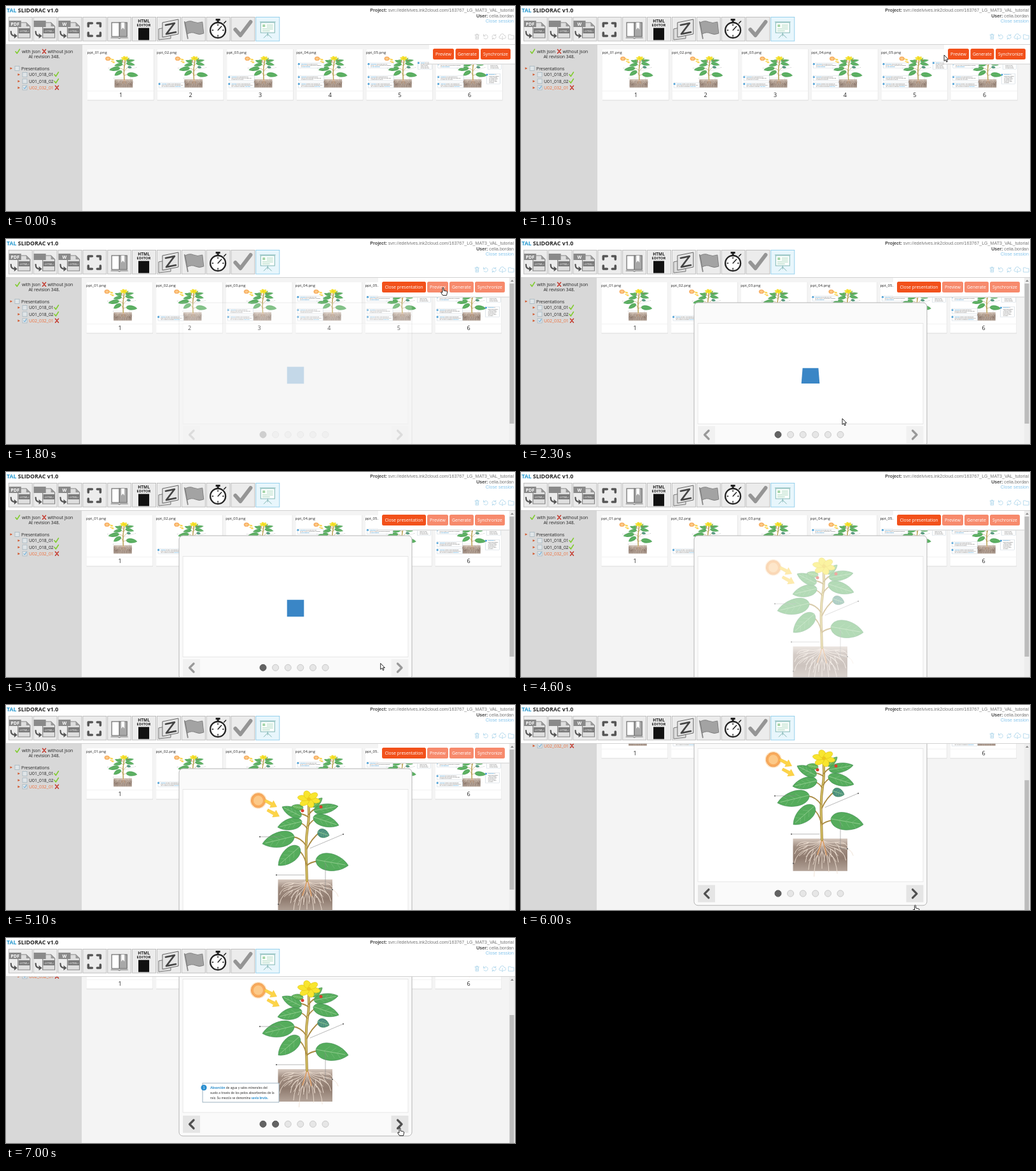
An HTML page for the animation above (7.1 s loop, 800 px wide and 322 px high).

```html
<!DOCTYPE html>
<html lang="en">
<head>
<meta charset="utf-8">
<style>
  html, body { margin: 0; width: 100%; height: 100%; overflow: hidden; background: #fff; }
  svg { display: block; width: 800px; height: 322px; font: 6.9px "Open Sans", sans-serif; fill: #222; }
  .line { fill: none; stroke-linecap: round; stroke-linejoin: round; }
  .arial { font: 7.1px "Liberation Sans", sans-serif; fill: #777; }
  .note { font: 5.2px Lato, sans-serif; fill: #333; }
  .blue { fill: #1d86c8; font-weight: bold; }
  #controls { color: #999; }
  #controls.ready { color: #505050; }
  .nav { fill: #f1f1f1; }
  .ready .nav { fill: #e5e5e5; }
</style>
</head>
<body>
<svg id="stage" viewBox="0 0 800 322"></svg>
<script>
const text = (x, y, s, attrs = '') => `<text x="${x}" y="${y}" ${attrs}>${s}</text>`;
const rect = (x, y, w, h, fill, attrs = '') =>
  `<rect x="${x}" y="${y}" width="${w}" height="${h}" fill="${fill}" ${attrs}/>`;
const circle = (x, y, r, fill, attrs = '') => `<circle cx="${x}" cy="${y}" r="${r}" fill="${fill}" ${attrs}/>`;
const line = (d, color, width = 1, attrs = '') =>
  `<path class="line" d="${d}" stroke="${color}" stroke-width="${width}" ${attrs}/>`;
const shape = (d, fill, attrs = '') => `<path d="${d}" fill="${fill}" ${attrs}/>`;
const group = (id, body, attrs = '') => `<g id="${id}" ${attrs}>${body}</g>`;
const at = (x, y, body) => `<g transform="translate(${x} ${y})">${body}</g>`;
const times = (n, f) => Array.from({ length: n }, (_, i) => f(i)).join('');

// ---- plant picture ----
function leaf(x, y, tx, ty, w, color = '#55ac5c') {
  const dx = tx - x, dy = ty - y, len = Math.hypot(dx, dy), nx = -dy / len * w, ny = dx / len * w;
  const point = (k, s) => `${x + dx * k + nx * s} ${y + dy * k + ny * s}`;
  const ribs = [.25, .45, .65].map(k =>
    `M${point(k + .15, .45)}L${point(k, 0)}L${point(k + .15, -.45)}`).join('');
  return shape(`M${x} ${y}C${point(.05, 1)} ${point(.68, 1)} ${tx} ${ty}C${point(.68, -1)} ${point(.05, -1)} ${x} ${y}`,
    color, 'stroke="#37854a" stroke-width=".6"') +
    line(`M${x} ${y}L${point(.9, 0)}`, '#9fd49a', .8) + line(ribs, '#82c584', .5);
}
const sunArrow = (x, y, deg) =>
  `<g transform="translate(${x} ${y}) rotate(${deg})">${shape('M0 -2L12 -2.5V-6L21 0L12 6V2.5L0 2Z', '#fdd447', 'stroke="#f3c02c" stroke-width=".5"')}</g>`;
const flower = times(6, i =>
  `<ellipse cx="9.5" rx="8.5" ry="5.5" transform="translate(476 80) scale(1 .75) rotate(${i * 60 + 15})" fill="#f8e52e" stroke="#d9bd12" stroke-width=".6"/>`);
const roots = times(13, i => {
  const a = (i - 6) * .235, reach = 42 + i % 3 * 7, sx = Math.sin(a), sy = Math.cos(a);
  const mx = 473 + sx * reach * .5, my = 209 + sy * reach * .42;
  return line(`M473 207Q${473 + sx * 6} ${213 + sy * 8} ${mx} ${my}T${473 + sx * reach * .95} ${211 + sy * reach}` +
    `M${mx} ${my}q${sx * 4 + 3} 3 ${sx * 12 + 4} ${sy * 14}M${mx} ${my}q${sx * 4 - 3} 4 ${sx * 10 - 5} ${sy * 12 + 3}`, '#eedfd2', .9);
});
const plant =
  rect(427.5, 206, 85.5, 51, 'url(#soil)') + roots +
  line('M473 208Q470 220 466 231M474 208Q478 220 480 232', '#d99a63', 1.6) +
  line('M473 208C472 170 470 150 474 125S475 100 476 86', '#a98b3e', 4) +
  line('M473 208C472 170 470 150 474 125S475 100 476 86', '#d8c66a', 1.8) +
  line('M472 182Q468 165 459 160M473 184Q478 179 490 177M471 152Q464 141 451 139M473 158Q480 142 494 131M473 126Q470 120 462 117M475 122Q480 114 486 111M475 108Q470 104 460 102M476 104Q482 96 487 95', '#a98a42', 1.8) +
  leaf(461, 155, 428, 184, 15) + leaf(453, 138, 403, 150, 16) + leaf(465, 115, 427, 124, 12) +
  leaf(464, 107, 434, 92, 10) + leaf(467, 94, 449, 91, 6, '#62b352') +
  leaf(487, 175, 538, 184, 18) + leaf(483, 108, 523, 121, 12) + leaf(484, 98, 522, 91, 10) +
  leaf(482, 92, 497, 78, 6, '#62b352') + leaf(490, 131, 508, 137, 9, '#4c8f80') +
  flower + circle(476, 80, 3, '#ecc81c') +
  circle(466, 98, 2.5, '#d8402c') + circle(495, 92, 2.5, '#d8402c') +
  circle(396.5, 82, 13, '#fde3bd') + circle(396.5, 82, 11, '#f8ab5c', 'stroke="#ea7a2c" stroke-dasharray="1.5 1"') +
  circle(396.5, 82, 7.5, '#fcc988') + sunArrow(407, 82, 28) + sunArrow(411, 97, 28) +
  line('M399 139h33M425 199h44M530 135L478 157M502 180v42M513 222h-10', '#888', .6) +
  [[399, 139], [425, 199], [530, 135], [513, 222], [428, 245]].map(p => circle(...p, 1, '#555')).join('');

const note = (x, y, w, n, lines) =>
  rect(x + 3, y, w, lines.length * 8 + 6, '#fff', 'stroke="#93aabb" stroke-width=".9"') +
  circle(x + 5, y + 7, 4.6, '#2b8fd0') + text(x + 5, y + 9, n, 'class="note" style="fill:#fff" text-anchor="middle"') +
  lines.map((s, i) => text(x + 15, y + 9 + i * 8, s, 'class="note"')).join('');
const blue = s => `<tspan class="blue">${s}</tspan>`;
const wide = [
  [blue('Absorción') + ' de agua y sales minerales del', 'suelo a través de los pelos absorbentes de la', 'raíz. Su mezcla se denomina ' + blue('savia bruta.')],
  [blue('Transporte') + ' de la savia bruta por los', 'vasos del tallo hasta llegar a las hojas, que', 'la reciben por sus nervios.'],
  [blue('Fotosíntesis') + ' en las hojas con la luz', 'del sol y el aire: la savia bruta se convierte', 'en ' + blue('savia elaborada.')]];
const narrow = [
  [blue('Reparto') + ' de la savia', 'por toda la planta,', 'desde las hojas', 'hasta la raíz, por', 'los vasos del tallo.'],
  [blue('Respiración:') + ' la', 'planta toma oxígeno', 'y expulsa dióxido', 'de carbono, tanto', 'de día como de', 'noche, por todas', 'sus partes.']];
const notes = [
  note(306, 228, 120, 1, wide[0]), note(306, 186, 120, 2, wide[1]), note(306, 108, 120, 3, wide[2]),
  note(540, 101, 64, 4, narrow[0]), note(534, 172, 64, 5, narrow[1])];

// ---- page ----
const thumbs = times(6, i => at(i * 109.6, 0,
  rect(128, 68, 104.5, 80.5, '#dcdcdc') + rect(128, 68, 104, 79.5, '#fff') + rect(128, 133, 104, .7, '#eee') +
  `<g transform="translate(27.4 61.4) scale(.335 .26)"><use href="#plant"/>${notes.slice(0, i).join('')}</g>` +
  text(127.5, 75, `ppt_0${i + 1}.png`, 'font-size="6"') +
  text(180.5, 143, i + 1, 'font-size="9" text-anchor="middle"')));

const button = (x, w, label, on = true) =>
  rect(x, 67, w, 17, on ? '#f2511b' : '#f78a6c', 'rx="2.5"') +
  text(x + w / 2, 78, label, 'fill="#fff" text-anchor="middle"');
const bar = (x, w) => rect(x, 62, w, 30, '#ddd') + rect(x, 61, w, 29.5, '#fff');

const tick = (x, y) => line(`M${x - 3} ${y}l2.3 3l4.2 -6.5`, '#7fcb2c', 1.5);
const cross = (x, y) => line(`M${x - 2.5} ${y - 3}l5 6M${x + 2.5} ${y - 3}l-5 6`, '#c4382c', 1.5);
const row = (x, y, label, fill = '#222') =>
  shape(`M${x - 1.5} ${y - 1.8}l3.6 1.8l-3.6 1.8Z`, '#d2562a') +
  rect(x + 6, y - 3.5, 7, 7, '#e0e5e8', 'stroke="#9fb2bd" stroke-width=".7"') +
  text(x + 16, y + 2.5, label, `style="fill:${fill}"`);
const sidebar =
  tick(18, 71.5) + text(25, 74, 'with json') + cross(60, 71.3) + text(65.5, 74, 'without json') +
  text(60, 81.6, 'At revision 348.', 'text-anchor="middle"') +
  row(8, 98, 'Presentations') + row(20, 107.8, 'U01_018_01') + tick(79, 107.5) +
  row(20, 118.2, 'U01_018_02') + tick(79, 118) +
  row(20, 128.4, 'U02_032_01', '#f0703c') + cross(80, 128.2) + line('M28 128.4l1.5 1.7l2.3 -4', '#2b8fd0', .8);

const navButton = (x, d) => rect(x, 294, 27, 27, 'inherit', 'class="nav"') + line(d, 'currentColor', 3.2);
const modal =
  rect(272, 100, 366, 226, '#fafafa', 'id="box" rx="6" stroke="#b5b5b5"') +
  rect(278, 132.5, 354, 158, '#fff', 'id="slide" stroke="#e2e2e2" stroke-width=".8"') +
  '<polygon id="cube" fill="#3a86c6"/>' +
  '<use href="#plant" id="picture" y="68"/>' + group('firstNote', notes[0], 'transform="translate(0 68)"') +
  group('controls',
    navButton(278, 'M295 301l-6.5 6.5l6.5 6.5') + navButton(605.5, 'M615.5 301l6.5 6.5l-6.5 6.5') +
    times(6, i => circle(404 + i * 19.6, 307.3, 5, i ? '#e6e6e6' : '#636363', `class="dot" stroke="${i ? '#c9c9c9' : '#555'}"`)));

// ---- header ----
const doc = label =>
  shape('M15 9H28L34 15V33H15Z', '#dedede', 'stroke="#858585" stroke-width="1.2"') + shape('M28 9V15H34Z', '#999') +
  rect(1, 6, 19, 10, '#8a8a8a') + text(10.5, 13.8, label, 'style="fill:#fff" font-size="7" font-weight="bold" text-anchor="middle"') +
  rect(16, 18, 18, 8, '#7a7a7a') + text(25, 23.6, '&lt;HTML&gt;', 'style="fill:#fff" font-size="4" text-anchor="middle"') +
  line('M4 23Q4 30 10 30', '#555', 2.2) + shape('M9 26L14 30L9 34Z', '#555');
const tools = [
  doc('PDF'), doc(''), doc('W'),
  line('M9 15V10H15M23 10H28V15M28 25V30H23M15 30H9V25', '#555', 3.6),
  rect(7, 9, 12, 22, '#fff', 'stroke="#777" stroke-width="1.3"') + rect(19, 9, 12, 22, '#a8a8a8', 'stroke="#777" stroke-width="1.3"') +
    shape('M22 9h5v11l-2.5 -3l-2.5 3Z', '#fff') + line('M6 33H17L19 34L21 33H32', '#777', 1.2),
  text(18.5, 9, 'HTML', 'font-size="6.5" font-weight="bold" text-anchor="middle"') +
    text(18.5, 15, 'EDITOR', 'font-size="6" font-weight="bold" text-anchor="middle"') + rect(10, 17.5, 17, 19, '#111'),
  shape('M3 19L22 15V34L3 36Z', '#ddd', 'stroke="#777"') + shape('M9 9L34 4V27L9 32Z', '#e6e6e6', 'stroke="#666"') +
    line('M14 13L28 10L15 27L30 24', '#444', 2.6),
  line('M5 8L10 34', '#888', 1.8) + shape('M6 9Q13 5 19 8T33 8L35 26Q28 29 22 26T9 27Z', '#a3a3a3', 'stroke="#808080"'),
  circle(18.5, 21, 12, '#fff', 'stroke="#222" stroke-width="2.3"') + rect(15, 3, 7, 3, '#222') + rect(17, 5, 3, 4, '#222') +
    line('M28 10l3 -3M18.5 21L24 15M18.5 12v1.5M18.5 29v1.5M9.5 21h1.5M26 21h1.5', '#222', 1.5),
  line('M7 20L15 29L31 8', '#959595', 6),
  rect(8, 9, 22, 16, '#fbfffd', 'stroke="#82b7b4" stroke-width="1"') +
    line('M7 8H31M19 25V30M19 27L13 33M19 27L25 33', '#82b7b4', 1) + rect(11, 12, 4, 4, '#a5d5a8') +
    line('M18 13H27M18 16H27M11 19H27M11 22H22', '#8fc7a8', .8)];
const toolbar = tools.map((icon, i) => at(3.8 + i * 38.85, 17,
  rect(.5, .5, 37, 37.5, i < 10 ? '#ececec' : '#e8f6fc', `stroke="${i < 10 ? '#b9b9b9' : '#8dcdea'}" stroke-width=".9"`) + icon)).join('');
const actions =
  'M737 45.5h6.5M739 45v-1h2.5v1M738 46v6h4.6v-6M739.5 47.5v3M741.2 47.5v3' +
  'M751 47a3.3 3.3 0 1 1 0 3M750.5 44.5v2.7h2.6' +
  'M764 49a3.2 3.2 0 0 1 5.6 -2.6M770.2 48a3.2 3.2 0 0 1 -5.6 2.6M769.8 44.5v2h-2M764.4 52.5v-2h2' +
  'M778 51h-1a2 2 0 0 1 0 -4a3 3 0 0 1 6 -.6a2.2 2.2 0 0 1 .5 4.6h-1M780.2 47.5v5M778.7 51l1.5 1.6l1.5 -1.6' +
  'M790 45h3l1 1.2h4v5.8h-8Z';
const header =
  rect(0, 0, 800, 60.5, '#fff') + rect(0, 60, 800, .8, '#c8c8c8') +
  text(1, 10.4, '<tspan fill="#2799cf">TAL</tspan> SLIDORAC v1.0', 'font-size="8.8" font-weight="bold"') +
  text(798, 9, '<tspan font-weight="bold" fill="#444">Project:</tspan> svn://edelvives.ink2cloud.com/163767_LG_MAT3_VAL_tutorial', 'class="arial" text-anchor="end"') +
  text(798, 17.5, '<tspan font-weight="bold" fill="#444">User:</tspan> celia.bordan', 'class="arial" text-anchor="end"') +
  text(798, 25.6, 'Close session', 'class="arial" style="fill:#86c5ec" text-anchor="end"') +
  toolbar + line(actions, '#a9d3ea', .8, 'id="actions"');

const scrollbar = rect(791, 61, 9, 261, '#ededed') + shape('M793 67l2.5 -3l2.5 3Z', '#888') +
  rect(791.5, 70, 7, 220, '#bcbcbc', 'id="thumb"');
const pointer =
  shape('M0 0V9.5L2.2 7.5L3.8 11L5.3 10.3L3.8 7H6.7Z', '#fff', 'id="arrow" stroke="#111" stroke-width=".9"') +
  shape('M-1 1Q0 -.6 1 1V5L5.5 6Q6.8 6.3 6.5 8L5.5 12.5H-.5L-3.5 8Q-3.6 6.5 -1 8Z', '#fff', 'id="hand" stroke="#111" stroke-width=".9"');

document.getElementById('stage').innerHTML =
  `<defs><linearGradient id="soil" x2="0" y2="1"><stop stop-color="#d6c8be"/><stop offset=".25" stop-color="#a08d81"/><stop offset=".6" stop-color="#8f7b6f"/><stop offset="1" stop-color="#b3a398"/></linearGradient>${group('plant', plant)}</defs>` +
  rect(0, 0, 800, 322, '#f4f4f4') + rect(0, 60, 120, 262, '#d8d8d8', 'id="panel"') +
  group('page', sidebar + group('thumbs', thumbs) +
    group('closedBar', bar(665, 135) + button(671, 33, 'Preview') + button(706.5, 37, 'Generate') + button(746, 47, 'Synchronize')) +
    group('openBar', bar(585, 206) + button(591, 69, 'Close presentation') + button(662, 33, 'Preview', false) +
      button(697, 38, 'Generate', false) + button(737, 47, 'Synchronize', false)) +
    group('modal', modal)) +
  header + group('scrollbar', scrollbar) + group('pointer', pointer);

// ---- motion ----
const el = id => document.getElementById(id);
const set = (id, name, value) => el(id).setAttribute(name, value);
const show = (id, on) => set(id, 'visibility', on ? 'visible' : 'hidden');
const ramp = (t, a, b) => Math.min(1, Math.max(0, (t - a) / (b - a)));
const ease = u => u * u * (3 - 2 * u);
const secondDot = document.querySelectorAll('.dot')[1];

const route = [[100, 560, 276], [900, 650, 120], [1100, 665, 77], [1500, 687, 76], [1800, 687, 76], [2300, 505, 282],
  [2600, 505, 282], [3200, 618, 307], [4200, 618, 307], [4400, 620, 330], [5800, 620, 330], [6200, 619, 298], [7100, 619, 298]];
function pointerAt(t) {
  const i = Math.max(1, route.findIndex(p => p[0] > t));
  const [a, x, y] = route[i - 1], [b, x2, y2] = route[i], k = ease(ramp(t, a, b));
  return [x + (x2 - x) * k, y + (y2 - y) * k];
}

// A square that flips about its x axis, then about its y axis.
function cubePoints(t) {
  const p = Math.max(0, t - 1860) / 1150 % 1, depth = 78;
  const a = -Math.PI * ease(Math.min(1, 2 * p)), b = -Math.PI * ease(Math.max(0, 2 * p - 1));
  return [[-1, -1], [1, -1], [1, 1], [-1, 1]].map(([sx, sy]) => {
    const x = sx * 13.3, y = sy * 13.3, z = -x * Math.sin(b);
    const k = depth / (depth - y * Math.sin(a) - z * Math.cos(a));
    return [455 + x * Math.cos(b) * k, 214 + (y * Math.cos(a) - z * Math.sin(a)) * k];
  }).join(' ');
}

function draw(t) {
  const open = t >= 1800, loaded = t >= 4200, next = t >= 6500;
  const scroll = 68 * ease(ramp(t, 5400, 6100));
  set('page', 'transform', `translate(0 ${-scroll})`);
  set('thumbs', 'transform', `translate(${open ? -1.5 : 0} 0)`);
  set('panel', 'width', open ? 119 : 120);
  set('actions', 'stroke', t < 100 ? '#c9c9c9' : '#a9d3ea');
  show('closedBar', !open);
  show('openBar', open);
  show('scrollbar', open);
  set('thumb', 'y', 70 + scroll * .75);

  set('modal', 'opacity', ramp(t, 1700, 2100));
  set('box', 'height', loaded ? 279 : 226);
  set('slide', 'height', loaded ? 209.5 : 158);
  set('controls', 'transform', `translate(0 ${loaded ? 53 : 0})`);
  set('controls', 'class', loaded ? 'ready' : '');
  secondDot.setAttribute('fill', next ? '#636363' : '#e6e6e6');
  secondDot.setAttribute('stroke', next ? '#555' : '#c9c9c9');
  set('cube', 'points', cubePoints(t));
  show('cube', open && !loaded);
  set('picture', 'opacity', ramp(t, 4200, 5100));
  set('firstNote', 'opacity', ramp(t, 6400, 7000));

  const hand = t >= 1400 && t < 1900 || t >= 3200;
  set('pointer', 'transform', `translate(${pointerAt(t)})`);
  show('arrow', t >= 100 && !hand);
  show('hand', hand);
}

const start = performance.now();
function loop() {
  const t = (performance.now() - start) % 7100;
  draw(Math.floor(t / 100) * 100);
  requestAnimationFrame(loop);
}
loop();
</script>
</body>
</html>
```
